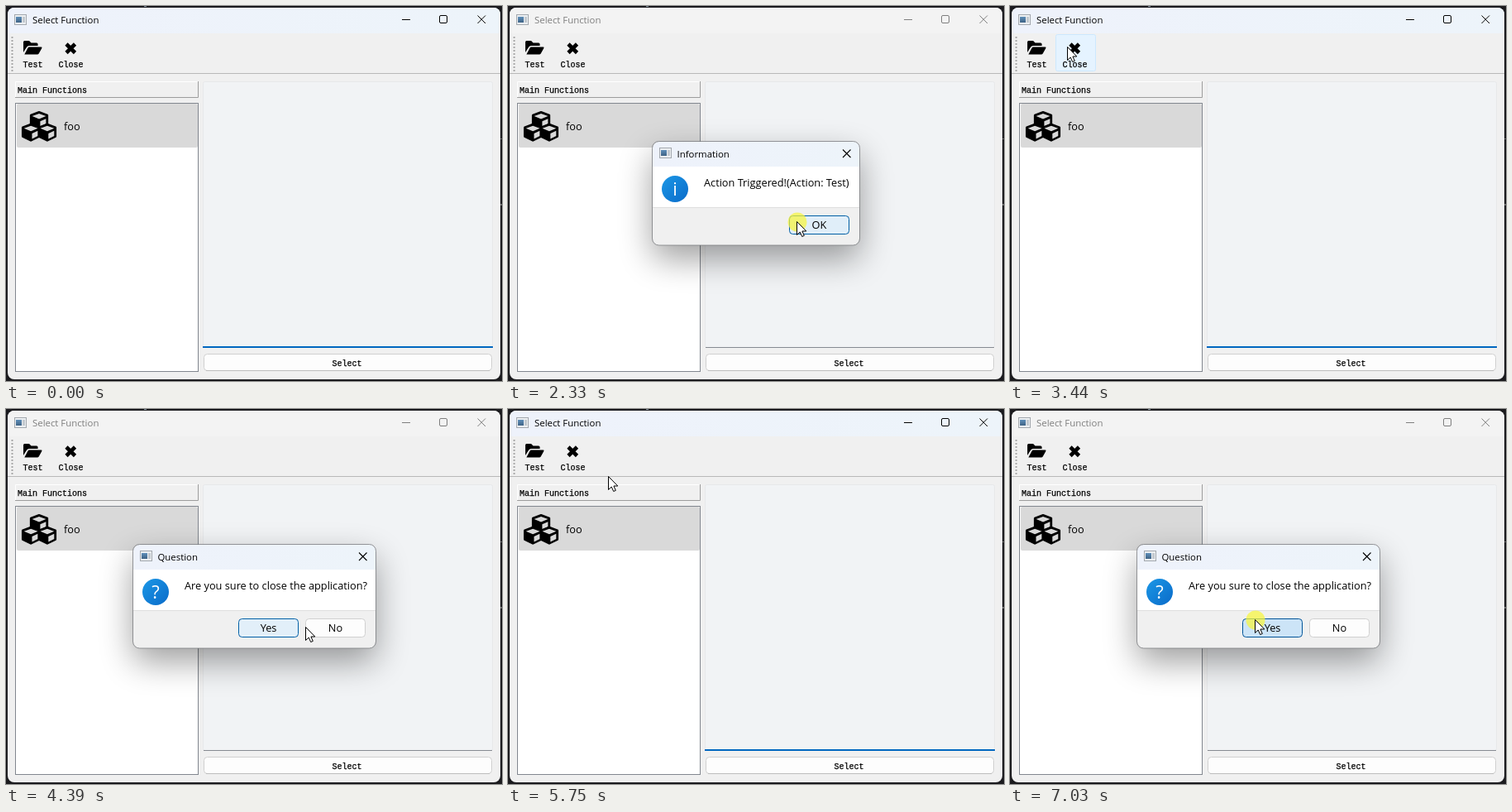
These frames come from a looping animation (600 by 453 pixels, 7.09 s). An HTML page:

```html
<!DOCTYPE html>
<html lang="en">
<head>
<meta charset="utf-8">
<title>Select Function</title>
<style>
  html, body { margin: 0; width: 100%; height: 100%; overflow: hidden; background: #1b1b1e; }
  svg { display: block; width: 600px; height: 453px; }
  text { font-family: "Open Sans", "Noto Sans", sans-serif; fill: #000; }
  .mono { font: 10px "Liberation Mono", "Noto Sans Mono", monospace; text-anchor: middle; stroke: #000; stroke-width: .25; }
  .title { font-size: 11.4px; }
  .body { font-size: 12.75px; }
  .mid { text-anchor: middle; }
  .glyph { font-size: 22px; fill: #fff; text-anchor: middle; }
  .shadow { filter: blur(20px); }
  .stroke { fill: none; stroke: #000; }
</style>
</head>
<body>
<svg id="stage" viewBox="0 0 600 453"></svg>
<script>
const LOOP = 7090;
const stage = document.getElementById('stage');

const rect = (x, y, w, h, fill, extra = '') =>
  `<rect x="${x}" y="${y}" width="${w}" height="${h}" fill="${fill}" ${extra}/>`;
const label = (x, y, cls, str, extra = '') =>
  `<text x="${x}" y="${y}" class="${cls}" ${extra}>${str}</text>`;
const path = (d, extra = '') => `<path d="${d}" ${extra}/>`;

const appIcon = (x, y) =>
  rect(x + .5, y + .5, 14, 12, '#eceff2', 'stroke="#a3a8ae"') +
  rect(x + 2, y + 3, 7, 7, 'url(#iconBlue)') +
  rect(x + 10, y + 3, 3, 7, '#c3c9cf');

const cube = (x, y) => `<g transform="translate(${x} ${y}) scale(.082)">` +
  path('M0-58L120-14V118L0 178L-120 118V-14Z', 'stroke="#000" stroke-width="32" stroke-linejoin="round"') +
  path('M0-38L102 0L0 41L-102 0ZM17 76L102 37V112L17 155Z', 'fill="#d9d9d9"') + '</g>';

const defs = `<defs>
  <linearGradient id="caption"><stop stop-color="#eef2fb"/><stop offset="1" stop-color="#edf4fa"/></linearGradient>
  <linearGradient id="iconBlue" x2="0" y2="1"><stop stop-color="#5f8fba"/><stop offset="1" stop-color="#3f6385"/></linearGradient>
  <linearGradient id="badge" x2="1" y2="1"><stop stop-color="#1b97e6"/><stop offset="1" stop-color="#0a6bc9"/></linearGradient>
  <clipPath id="frame"><rect x="2" y="2" width="596" height="449" rx="8"/></clipPath>
</defs>`;

const hoverBox = (id, x, w) =>
  rect(x + .5, 34.5, w, 44, '#e5f3ff', `id="${id}" rx="2" stroke="#cce8ff"`);

const mainWindow = rect(0, 0, 600, 453, '#1b1b1e') +
  rect(167, 0, 3, 1, '#8a96a0') + rect(598, 160, 2, 1, '#666') + rect(598, 239, 2, 2, '#666') +
  `<g clip-path="url(#frame)">` +
  rect(0, 0, 600, 453, '#f0f0f0') +
  rect(0, 0, 600, 33, 'url(#caption)', 'id="captionBar"') +
  rect(0, 81, 600, 1, '#b9b9b9') + '</g>' +
  appIcon(10, 10) +
  `<g id="chrome">` + label(32, 21, 'title', 'Select Function') +
  path('M479 16.5H489M570.5 11.5L580 21M580 11.5L570.5 21', 'class="stroke"') +
  rect(524.5, 11.5, 9, 9, 'none', 'rx="1.5" stroke="#000"') + '</g>' +
  path('M7.5 37V79', 'stroke="#a8a8a8" stroke-width="2" stroke-dasharray="2 2"') +
  hoverBox('testHover', 11, 43) + hoverBox('closeHover', 55, 48) +
  path('M21 56V43.5Q21 42 22.5 42H28L30.5 44.5H37Q38.5 44.5 38.5 46V48H28Q26 48 25 49.7ZM22.3 58.5L26.5 50.6Q27 49.6 28.3 49.6H42.5Q44 49.6 43.3 51L39.7 57.5Q39 58.5 38 58.5Z') +
  path('M73 46L83.5 56.5M83.5 46L73 56.5', 'class="stroke" stroke-width="4.6"') +
  label(32.5, 74, 'mono', 'Test') + label(78.5, 74, 'mono', 'Close') +
  rect(11, 91, 222, 20, '#f0f0f0') +
  path('M11.5 110V91.5H232', 'fill="none" stroke="#fff"') +
  path('M11 110.5H232.5V91', 'fill="none" stroke="#9d9d9d"') +
  label(56, 105, 'mono', 'Main Functions') +
  rect(11.5, 117.5, 221, 324, '#fff', 'stroke="#82878f"') +
  rect(13, 118, 219, 53, '#d9d9d9', 'rx="2"') +
  cube(40, 133.1) + cube(30.1, 147.8) + cube(49.9, 147.8) +
  label(70, 150, 'body', 'foo') +
  rect(238.5, 91.5, 350, 321, '#f1f3f5', 'rx="2" stroke="#e7e8ea"') +
  `<path id="focusLine"/>` +
  rect(239.5, 420.5, 348, 20, '#fdfdfd', 'rx="4" stroke="#d0d0d0"') +
  path('M242 440.5H585', 'stroke="#bcbcbc"') +
  label(412.5, 435, 'mono', 'Select');

const button = (id, x, str) =>
  rect(x + .5, 253.5, 72, 22, '#fdfdfd', `id="${id}" rx="4"`) +
  label(x + 36.5, 269, 'body mid', str);

function dialog(id, x, w, title, glyph, message, buttons) {
  const clip = id + 'Clip';
  return `<g id="${id}"><clipPath id="${clip}">${rect(x, 164, w, 125, '#000', 'rx="8"')}</clipPath>` +
    rect(x, 180, w, 125, '#000', 'rx="8" opacity=".38" class="shadow"') +
    `<g clip-path="url(#${clip})">` +
    rect(x, 164, w, 30, 'url(#caption)') + rect(x, 194, w, 49, '#fff') +
    rect(x, 243, w, 46, '#f0f0f0') + rect(x, 243, w, 1, '#dfdfdf') + '</g>' +
    rect(x - .5, 163.5, w + 1, 125.5, 'none', 'rx="8" stroke="#77797c" stroke-opacity=".75"') +
    appIcon(x + 8, 171) + label(x + 29.5, 183, 'title', title) +
    path(`M${x + w - 20} 173.5l9.5 9.5m0-9.5l-9.5 9.5`, 'class="stroke" stroke-width="1.1"') +
    `<circle cx="${x + 27}" cy="221" r="16" fill="url(#badge)"/>` +
    label(x + 27, 229, 'glyph', glyph) +
    label(x + 62, 218, 'body', message) + buttons + '</g>';
}

stage.innerHTML = defs + mainWindow +
  dialog('info', 175, 250, 'Information', 'i', 'Action Triggered!(Action: Test)', button('ok', 340, 'OK')) +
  dialog('question', 154, 293, 'Question', '?', 'Are you sure to close the application?',
    button('yes', 281, 'Yes') + button('no', 362, 'No')) +
  `<g id="pointer"><circle id="halo" r="11.5" fill="#f6f53c"/>` +
  path('M-.5-.5V15.5L3.2 12L5.7 17.5L8.3 16.4L5.9 11H10.8Z', 'fill="#fff" stroke="#000" stroke-linejoin="round"') +
  '</g>';

const el = {};
stage.querySelectorAll('[id]').forEach(node => el[node.id] = node);

// Pointer route: time, x, y
const route = [
  [70, 240, 330], [330, 150, 204], [680, 38, 60], [1200, 38, 60], [1630, 156, 152],
  [1700, 156, 152], [2130, 343, 259], [2260, 350, 261], [2500, 350, 261], [2950, 62, 46],
  [3130, 70, 50], [3500, 70, 50], [3990, 342, 258], [4060, 342, 258], [4190, 353, 264],
  [4320, 353, 264], [4390, 363, 264], [5220, 363, 264], [5540, 197, 190], [5750, 122, 82],
  [5960, 80, 54], [6250, 80, 54], [6550, 306, 258], [6690, 306, 258], [6760, 297, 255]
];
const presses = [[950, 1090], [2320, 2470], [3300, 3430], [4530, 5140], [6070, 6190], [6960, LOOP]];
const infoSpan = [1110, 2470];
const questionSpans = [[3450, 5140], [6210, LOOP + 1000]];

const within = (t, [a, b]) => t >= a && t < b;
const ramp = (t, start, length) => Math.max(0, Math.min(1, (t - start) / length));
const pulse = (t, a, b, fade = 120) => ramp(t, a, fade) * (1 - ramp(t, b, fade));
const mix = (from, to, k) => from.map((v, i) => v + (to[i] - v) * k);
const show = (node, on) => node.setAttribute('visibility', on ? 'visible' : 'hidden');

function pointerAt(t) {
  const next = route.findIndex(p => p[0] > t);
  if (next < 0) return route[route.length - 1].slice(1);
  if (next === 0) return route[0].slice(1);
  const a = route[next - 1], b = route[next];
  const k = (t - a[0]) / (b[0] - a[0]);
  return mix(a.slice(1), b.slice(1), k * k * (3 - 2 * k));
}

function placeDialog(node, spans, t, ox, oy) {
  const span = spans.find(([a, b]) => t >= a && t < b + 130);
  show(node, span);
  if (!span) return;
  const opened = ramp(t, span[0], 180), closed = ramp(t, span[1], 130);
  const scale = .845 + .155 * opened - .1 * closed;
  node.setAttribute('opacity', Math.min(1, opened * 1.2) * (1 - closed));
  node.setAttribute('transform', `translate(${ox} ${oy}) scale(${scale}) translate(${-ox} ${-oy})`);
}

function paintButton(node, hover, pressed, isDefault) {
  const fill = mix(mix([253, 253, 253], [224, 238, 249], hover), [204, 228, 247], pressed);
  const rest = isDefault ? [0, 103, 184] : [208, 208, 208];
  const stroke = mix(mix(rest, [0, 95, 165], hover), [0, 84, 153], pressed);
  node.setAttribute('fill', `rgb(${fill.map(Math.round)})`);
  node.setAttribute('stroke', `rgb(${stroke.map(Math.round)})`);
}

function render(t) {
  const active = ![infoSpan, ...questionSpans].some(span => within(t, span));
  el.chrome.setAttribute('opacity', active ? 1 : .48);
  el.captionBar.setAttribute('fill', active ? 'url(#caption)' : '#f3f3f3');
  el.focusLine.setAttribute('d', active ? 'M238 412H589' : 'M239 412.5H588');
  el.focusLine.setAttribute('stroke', active ? '#0067c0' : '#868a91');
  el.focusLine.setAttribute('stroke-width', active ? 2 : 1);
  show(el.testHover, within(t, [600, 1110]));
  show(el.closeHover, within(t, [2900, 3450]) || within(t, [5880, 6210]));

  placeDialog(el.info, [infoSpan], t, 228.6, 200);
  placeDialog(el.question, questionSpans, t, 217, 200);
  paintButton(el.ok, pulse(t, 2090, 2600), pulse(t, 2340, 2470), true);
  paintButton(el.yes, Math.max(pulse(t, 3930, 4380, 180), pulse(t, 6500, LOOP)), ramp(t, 6930, 90), t < 4560 || t > 6000);
  paintButton(el.no, pulse(t, 4400, 5250), pulse(t, 4550, 5140), within(t, [4560, 6000]));

  const [x, y] = pointerAt(t);
  show(el.pointer, t >= 70);
  el.pointer.setAttribute('transform', `translate(${Math.round(x)} ${Math.round(y)})`);
  el.halo.setAttribute('opacity', presses.some(p => within(t, p)) ? .72 : 0);
}

const begin = performance.now();
function tick() {
  render((performance.now() - begin) % LOOP);
  requestAnimationFrame(tick);
}
tick();
</script>
</body>
</html>
```
